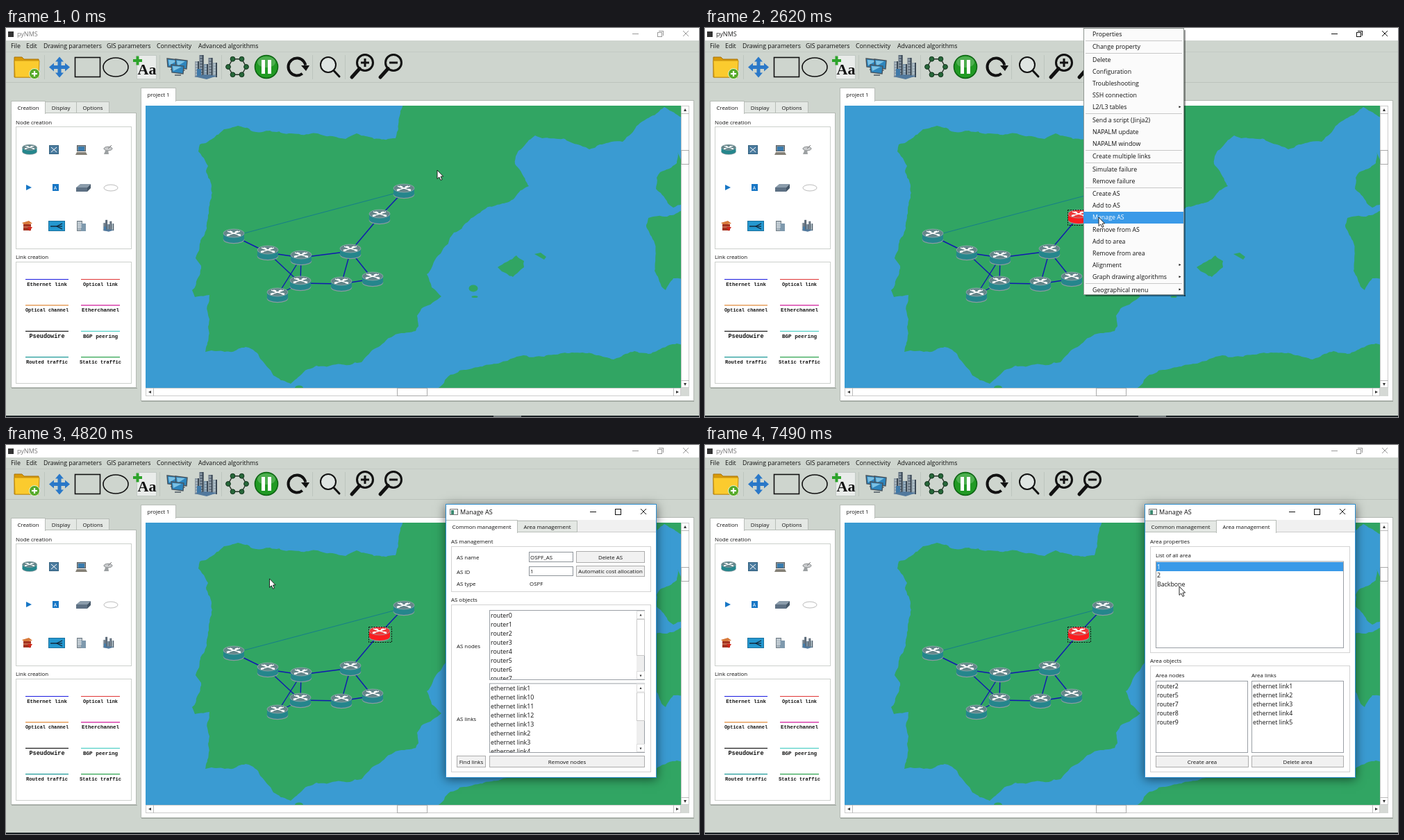
Animation of 998 by 561 pixels, one loop 8000 ms. Source, as an HTML page with a canvas:

```html
<!DOCTYPE html>
<html lang="en">
<head>
<meta charset="utf-8">
<title>pyNMS</title>
<style>
html, body { margin: 0; width: 100%; height: 100%; overflow: hidden; background: #ced5ce; }
canvas { display: block; width: 998px; height: 561px; }
</style>
</head>
<body>
<canvas id="stage" width="998" height="561"></canvas>
<script>
const c = document.getElementById('stage').getContext('2d');
const LOOP = 8000, BIG = 8.8, SMALL = 7.9;
const SANS = '"Open Sans", "Noto Sans", sans-serif';
const MONO = '"Liberation Mono", monospace';
const SEA = '#3a9bd2', LAND = '#31a563', ACCENT = '#3a9ae8', TEAL = '#25868c';

// ---------- helpers ----------
const clamp = v => Math.max(0, Math.min(1, v));
const ramp = (t, a, b) => clamp((t - a) / (b - a));
const smooth = u => u * u * (3 - 2 * u);
const easeOut = u => 1 - (1 - u) * (1 - u);

function rect(x, y, x2, y2, fill, stroke, w = 1) {
  if (fill) { c.fillStyle = fill; c.fillRect(x, y, x2 - x, y2 - y); }
  if (stroke) { c.strokeStyle = stroke; c.lineWidth = w; c.strokeRect(x + .5, y + .5, x2 - x - 1, y2 - y - 1); }
}
function line(x, y, x2, y2, color, w = 1) {
  c.strokeStyle = color; c.lineWidth = w;
  c.beginPath(); c.moveTo(x, y); c.lineTo(x2, y2); c.stroke();
}
function oval(x, y, rx, ry, fill, stroke, w = 1) {
  c.beginPath(); c.ellipse(x, y, rx, ry, 0, 0, 7);
  if (fill) { c.fillStyle = fill; c.fill(); }
  if (stroke) { c.strokeStyle = stroke; c.lineWidth = w; c.stroke(); }
}
function poly(p, fill, stroke, w = 1) {
  c.beginPath();
  for (let i = 0; i < p.length; i += 2) c.lineTo(p[i], p[i + 1]);
  c.closePath();
  if (fill) { c.fillStyle = fill; c.fill(); }
  if (stroke) { c.strokeStyle = stroke; c.lineWidth = w; c.stroke(); }
}
function text(s, x, y, size = SMALL, color = '#111', align = 'left', font = SANS, weight = '') {
  c.font = `${weight} ${size}px ${font}`;
  c.textAlign = align; c.fillStyle = color;
  c.fillText(s, x, y + 3);
}
function at(x, y, s, draw) {
  c.save(); c.translate(x, y); c.scale(s, s); draw(); c.restore();
}

// ---------- map ----------
let seed = 7;
const rnd = () => (seed = seed * 16807 % 2147483647) / 2147483647 - .5;

// Roughens each edge by splitting it at displaced midpoints.
function coast(...p) {
  const path = new Path2D();
  const edge = (x, y, x2, y2) => {
    const len = Math.hypot(x2 - x, y2 - y);
    if (len < 5 || len > 100) return path.lineTo(x2, y2);
    const k = Math.min(4, len * .2);
    const mx = (x + x2) / 2 + rnd() * k, my = (y + y2) / 2 + rnd() * k;
    edge(x, y, mx, my);
    edge(mx, my, x2, y2);
  };
  path.moveTo(p[0], p[1]);
  for (let i = 0; i < p.length - 2; i += 2) edge(p[i], p[i + 1], p[i + 2], p[i + 3]);
  path.closePath();
  return path;
}
const mainland = coast(
  572, 110, 563, 150, 561, 159, 530, 160, 505, 152, 489, 160, 440, 152, 425, 154, 380, 148, 360, 150,
  334, 141, 314, 146, 300, 158, 279, 168, 277, 178, 287, 192, 291, 199, 288, 206, 296, 228, 296, 245,
  285, 300, 273, 332, 281, 343, 268, 378, 272, 388, 293, 385, 290, 400, 293, 420, 287, 467, 315, 467,
  345, 460, 363, 470, 385, 501, 410, 513, 435, 492, 447, 487, 495, 486, 512, 482, 530, 463, 558, 444,
  590, 437, 594, 430, 592, 415, 598, 405, 627, 387, 613, 374, 606, 355, 645, 295, 685, 264, 720, 252,
  753, 228, 733, 196, 734, 185, 762, 155, 805, 160, 840, 175, 855, 168, 888, 164, 928, 128, 948, 114,
  973, 129, 973, 110);

const nodes = [[573, 235], [538, 272], [328, 300], [377, 324], [425, 331],
  [496, 322], [424, 368], [483, 369], [528, 362], [391, 385]];
const links = ['01', '15', '23', '34', '36', '45', '46', '49', '69', '67', '75', '78', '58'];

function router(x, y, s = 1, body = TEAL) {
  at(x, y, s, () => {
    oval(0, 5, 15.3, 6.2, '#8b9ba0');
    c.fillStyle = body;
    c.beginPath();
    c.ellipse(0, 4, 15, 6, 0, 0, Math.PI);
    c.lineTo(-15, -4); c.lineTo(15, -4);
    c.fill();
    oval(0, -4, 15, 6, body === TEAL ? '#65858a' : '#f0383a', '#9ab0b2', .7);
    for (const d of [1, -1]) {
      line(-9 * d, -6.8, 9 * d, -1.2, '#fff', 1.4);
      line(6 * d, -2, 10 * d, -1, '#fff', 2.4);
      line(-6 * d, -6.5, -2 * d, -5.3, '#fff', 2.4);
    }
  });
}

const africa = coast(619, 521, 640, 500, 700, 485, 745, 472, 775, 474, 800, 469, 830, 468,
  875, 478, 905, 466, 925, 470, 960, 456, 985, 455, 985, 521);
const corsica = coast(967, 179, 966, 195, 942, 208, 937, 216, 936, 232, 943, 238, 961, 259, 985, 250, 972, 190);
const sardinia = coast(985, 260, 952, 272, 925, 274, 922, 284, 934, 310, 934, 350, 950, 378, 961, 361, 985, 362);
const mallorca = coast(708, 345, 735, 328, 746, 336, 746, 345, 730, 359, 714, 351);

function map(selected) {
  c.save();
  c.beginPath(); c.rect(201, 112, 771, 407); c.clip();
  rect(201, 112, 972, 519, SEA);
  c.fillStyle = LAND;
  [mainland, africa, corsica, sardinia, mallorca].forEach(p => c.fill(p));
  poly([761, 326, 770, 324, 778, 330, 775, 334], LAND);
  oval(673, 375.5, 6.5, 5, LAND);
  oval(675, 387.5, 4.5, 1.6, LAND);
  oval(422, 519, 6, 3.5, LAND);
  line(328, 300, 573, 235, '#178087', 1.2);
  for (const [a, b] of links) line(...nodes[a], ...nodes[b], '#1018b0', 1.4);
  nodes.forEach(([x, y], i) => router(x, y, 1, selected && i === 1 ? '#fb1d20' : TEAL));
  if (selected) {
    c.setLineDash([2, 1.5]);
    rect(522, 262, 556, 285, null, '#111');
    c.setLineDash([]);
  }
  c.restore();
}

// ---------- icons ----------
function buildings(x, y, s) {
  at(x, y, s, () => {
    const tops = [-8, -17, -4, -13, -6], tones = ['#8f9ba4', '#5e6d7c', '#7b95a9', '#6d7a87', '#98a9b2'];
    tops.forEach((by, i) => {
      const bx = -15 + i * 6.5, w = 6;
      rect(bx, by, bx + w, 15, tones[i]);
      rect(bx + w - 2, by, bx + w, 15, '#3b4855');
      for (let k = by + 3; k < 13; k += 4) line(bx + 1, k, bx + w - 2, k, '#c9d8e2', .9);
    });
    rect(-12, 3, -6, 15, '#3f79a8');
    poly([-16, 14, 0, 11, 17, 13, 2, 18], '#52799d');
  });
}
function lens(x, y, r, hx, hy, w, sign) {
  const a = Math.atan2(hy - y, hx - x);
  c.lineCap = 'round';
  line(x + Math.cos(a) * r, y + Math.sin(a) * r, hx, hy, '#111', w);
  c.lineCap = 'butt';
  oval(x, y, r, r, sign ? null : '#dfe5e2', '#111', sign ? 3 : 2);
  if (sign) line(x - 6, y, x + 6, y, '#111', 3);
  if (sign === '+') line(x, y - 6, x, y + 6, '#111', 3);
}
function screen(x, y, w, h) {
  poly([x, y, x + w, y + 2, x + w - 1, y + h, x + 1, y + h - 2], '#2e85bd', '#47535d', 1.4);
  poly([x + 2, y + 2, x + w - 3, y + 3, x + 3, y + h - 4], '#7cc1e4');
  line(x + w / 2 - 4, y + h + 2, x + w / 2 + 5, y + h + 2, '#6d777d', 2);
}
function toolbar() {
  poly([12, 42, 23, 42, 26, 45, 47, 45, 47, 71, 12, 71], '#d99a08', '#a87306');
  poly([12, 47, 48, 47, 47, 71, 13, 71], '#fbcb2e', '#c79210');
  oval(41, 66, 7.5, 7.5, '#55a928', '#e7f3d5', 1);
  line(37, 66, 45, 66, '#fff', 2.2); line(41, 62, 41, 70, '#fff', 2.2);

  for (let k = 0; k < 4; k++) {
    c.save(); c.translate(77, 56.5); c.rotate(k * Math.PI / 2);
    poly([0, -15, 6, -8, 2.5, -8, 2.5, 0, -2.5, 0, -2.5, -8, -6, -8], '#2a78c8');
    c.restore();
  }
  rect(99, 42, 136, 71, null, '#111', 1.6);
  oval(158, 56.5, 18, 13.5, null, '#111', 1.6);

  rect(188, 39, 217, 74, '#e9ecea', '#c2cac5');
  text('Aa', 203, 63.5, 22, '#111', 'center', '"Liberation Serif", serif', 'bold');
  line(183, 47, 196, 47, '#2da32b', 4); line(189.5, 40.5, 189.5, 53.5, '#2da32b', 4);

  screen(232, 44, 18, 14); screen(244, 45, 17, 14); screen(238, 53, 18, 13);
  buildings(287, 56, 1);

  const hex = [...Array(6)].flatMap((_, i) => [333 + 13 * Math.cos(i * Math.PI / 3), 56 + 13 * Math.sin(i * Math.PI / 3)]);
  poly(hex, null, '#243026', 1.4);
  for (let i = 0; i < 12; i += 2) oval(hex[i], hex[i + 1], 3.4, 3.4, '#27683a', '#12331c');

  oval(375, 56, 16.5, 16.5, '#219a24', '#0d6413', 1.6);
  oval(375, 49, 13, 8, 'rgba(255,255,255,.2)');
  rect(368, 46, 373, 66, '#fff'); rect(377, 46, 382, 66, '#fff');

  c.strokeStyle = '#111'; c.lineWidth = 4;
  c.beginPath(); c.arc(419, 56, 12.5, .9, 6.1); c.stroke();
  poly([425, 54, 437, 54, 432, 62], '#111');

  lens(464, 53, 11, 480, 70, 3);
  lens(517, 50, 11.5, 498, 71, 5, '+');
  lens(558, 50, 11.5, 539, 71, 5, '-');
  for (const x of [55, 221, 310, 441, 488]) line(x + .5, 39, x + .5, 74, '#bdc5be');
}

function palette() {
  router(34, 175, .7);
  rect(62, 169, 76, 182, '#4a7b9f', '#34617f');
  line(65, 172, 73, 179, '#fff'); line(73, 172, 65, 179, '#fff');
  rect(102, 169, 115, 178, '#8c9295', '#555e64'); rect(104, 171, 113, 177, '#397caf');
  poly([102, 179, 115, 179, 117, 183, 100, 183], '#858177');
  oval(147, 174, 6, 2.8, '#c9cbcd', '#85898b'); line(147, 174, 152, 169, '#777');
  poly([143, 177, 147, 176, 148, 182, 141, 182], '#9ca0a2');
  arrow(33, 230, 1, 0, '#1676c5', 4);
  rect(67, 225, 76, 235, '#1676c5'); text('A', 71, 230, 7, '#fff', 'center');
  poly([101, 230, 107, 225, 122, 225, 117, 230], '#8b9cab');
  rect(101, 230, 117, 236, '#5e7184');
  poly([117, 230, 122, 225, 122, 231, 117, 236], '#455768');
  oval(151, 230.5, 10, 4.5, '#fff', '#bbb', 1);
  poly([23, 281, 33, 278, 38, 282, 27, 284], '#d87a3a');
  rect(25, 283, 36, 292, '#a3321f'); line(25, 287, 36, 287, '#e7a07a');
  poly([31, 287, 38, 287, 34, 293], '#d0261c');
  rect(61, 278, 85, 293, '#2497cf', '#1a719e');
  line(64, 286, 74, 286, '#123', 1.4);
  for (const y of [282, 286, 290]) line(73, 286, 81, y, '#123', 1.2);
  rect(102, 278, 110, 293, '#a8b4bd', '#75818a'); rect(108, 282, 115, 293, '#7e99ad');
  for (const y of [281, 284, 287]) line(103, y, 109, y, '#e6edf1');
  buildings(147, 285, .48);
}

const linkTypes = [
  ['Ethernet link', 7.4, '#1a1ae0'], ['Optical link', 6.95, '#e03434'],
  ['Optical channel', 6.9, '#e08a3a'], ['Etherchannel', 7.5, '#d0189a'],
  ['Pseudowire', 8.5, '#222'], ['BGP peering', 7.6, '#55d0c8'],
  ['Routed traffic', 7.15, '#1f9a98'], ['Static traffic', 7.15, '#2fa34f']];

// ---------- widgets ----------
function tab(s, x, x2, y, y2, on) {
  rect(x, on ? y - 1 : y, x2, on ? y2 + 1 : y2, on ? '#fff' : '#e4e8e4', '#b8bdb8');
  if (on) rect(x + 1, y2 - 1, x2 - 1, y2 + 2, '#fff');
  text(s, (x + x2) / 2, (y + y2) / 2, SMALL, '#111', 'center');
}
function button(s, x, y, x2, y2) {
  rect(x, y, x2, y2, '#f1f1f1', '#adadad');
  text(s, (x + x2) / 2, (y + y2) / 2 + .3, SMALL, '#111', 'center');
}
function arrow(x, y, dx, dy, color = '#333', r = 2) {
  poly([x + dx * r, y + dy * r, x - dx * r - dy * r, y - dy * r - dx * r, x - dx * r + dy * r, y - dy * r + dx * r], color);
}
function list(items, x, y, x2, y2, thumb) {
  rect(x, y, x2, y2, '#fff', '#9a9fa5');
  c.save();
  c.beginPath(); c.rect(x + 1, y + 1, x2 - x - 2, y2 - y - 2); c.clip();
  items.forEach((s, i) => text(s, x + 2, y + 7.8 + i * 13, BIG));
  c.restore();
  if (!thumb) return;
  rect(908, y + 1, 919, y2 - 1, '#eee');
  rect(908, y + 13, 920, thumb, '#fff', '#c9c9c9');
  rect(908, y + 1, 920, y + 13, '#fff', '#ddd');
  rect(908, y2 - 13, 920, y2 - 1, '#fff', '#ddd');
  arrow(914, y + 7, 0, -1, '#333', 1.5); arrow(914, y2 - 6, 0, 1, '#333', 1.5);
}
function controls(x1, x2, x3, y, color, restore) {
  if (x1) line(x1, y + .5, x1 + 9, y + .5, color);
  rect(x2, y - 4 + (restore ? 2 : 0), x2 + (restore ? 7 : 9), y + 5, null, color);
  if (restore) { line(x2 + 2, y - 3.5, x2 + 9, y - 3.5, color); line(x2 + 8.5, y - 3, x2 + 8.5, y + 3, color); }
  line(x3, y - 4, x3 + 8, y + 4, color); line(x3 + 8, y - 4, x3, y + 4, color);
}
function frame(x, y, x2, y2, body, active) {
  c.save();
  c.shadowColor = `rgba(0,0,0,${active ? .55 : .35})`;
  c.shadowBlur = active ? 14 : 9; c.shadowOffsetY = 2;
  rect(x, y, x2, y2, body);
  c.restore();
  rect(x, y, x2, y + 23, '#fff');
  rect(x, y, x2, y2, null, active ? '#2f8fd0' : '#9aa5a0');
  rect(x + 6, y + 7, x + 18, y + 16, '#f4f6f6', '#777');
  rect(x + 8, y + 9, x + 12, y + 15, '#3d8a72');
}
function appear(p, cx, cy, draw) {
  if (p <= 0) return;
  c.save();
  c.globalAlpha = p;
  const s = .94 + .06 * p;
  c.translate(cx, cy); c.scale(s, s); c.translate(-cx, -cy);
  draw();
  c.restore();
}

// ---------- windows ----------
function mainWindow(t) {
  const active = t >= 430 && t < 3180;
  rect(0, 0, 998, 561, '#ced5ce');
  rect(0, 0, 998, 18, '#fff');
  rect(3, 5, 11, 13, '#333');
  text('pyNMS', 16, 9.3, 9, active ? '#222' : '#777');
  controls(902, 938, 975, 8, active ? '#111' : '#999', true);
  [['File', 7], ['Edit', 29], ['Drawing parameters', 54], ['GIS parameters', 145], ['Connectivity', 217], ['Advanced algorithms', 277]]
    .forEach(([s, x]) => text(s, x, 26, BIG));
  line(0, 34.5, 998, 34.5, '#c3cac4');
  line(0, 78.5, 998, 78.5, '#bcc4bd');
  toolbar();

  rect(7, 122, 188, 519, '#fff', '#b4bab4');
  line(8, 519.5, 189, 519.5, '#9fa69f');
  tab('Display', 56, 102, 106, 123);
  tab('Options', 101, 149, 106, 123);
  tab('Creation', 7, 57, 106, 123, true);
  text('Node creation', 14, 135.5);
  rect(14, 142, 181, 319, null, '#ccd0cc');
  text('Link creation', 14, 329.5);
  rect(14, 337, 181, 513, null, '#ccd0cc');
  palette();
  linkTypes.forEach(([s, size, color], i) => {
    const x = i % 2 ? 136 : 59, y = 363 + (i >> 1) * 37.4, half = i % 2 ? 28 : 31;
    line(x - half, y - .5, x + half, y - .5, color, 1.2);
    text(s, x, y + 6, size, '#111', 'center', MONO, 'bold');
  });

  rect(194, 104, 991, 538, '#fff', '#b4bab4');
  line(195, 538.5, 991, 538.5, '#9fa69f');
  tab('project 1', 194, 245, 87, 105, true);
  map(t >= 1240);

  rect(972, 112, 984, 519, '#fff', '#ccc');
  line(972, 123.5, 984, 123.5, '#bbb'); line(972, 508.5, 984, 508.5, '#bbb');
  rect(972, 176, 984, 197, '#fff', '#aaa');
  arrow(978, 118, 0, -1); arrow(978, 514, 0, 1);
  rect(201, 519, 972, 531, '#fff', '#ccc');
  line(212.5, 519, 212.5, 531, '#bbb'); line(961.5, 519, 961.5, 531, '#bbb');
  rect(563, 519, 607, 531, '#fff', '#aaa');
  arrow(207, 525, -1, 0); arrow(967, 525, 1, 0);
  rect(972, 519, 984, 531, '#d5d9d5');

  rect(0, 559, 998, 561, '#1b2225');
  if (t < 4000) {
    const x = t < 430 ? 702 : 624;
    rect(x, 559, x + 40, 561, '#777f80');
  }
}

// '|' starts a new group, '>' opens a submenu
const menuItems = ('Properties,|Change property,|Delete,Configuration,Troubleshooting,SSH connection,>L2/L3 tables,' +
  '|Send a script (Jinja2),NAPALM update,NAPALM window,|Create multiple links,|Simulate failure,Remove failure,' +
  '|Create AS,Add to AS,Manage AS,Remove from AS,Add to area,Remove from area,>Alignment,>Graph drawing algorithms,' +
  '|>Geographical menu').split(',');

function contextMenu(alpha, hover) {
  if (alpha <= 0) return;
  c.save();
  c.globalAlpha = alpha;
  rect(690, 3, 692, 387, 'rgba(0,0,0,.4)'); rect(548, 385, 692, 387, 'rgba(0,0,0,.4)');
  rect(545, 0, 690, 385, '#fbfbfb', '#8f9691');
  if (hover) rect(545, 265, 689, 282, ACCENT);
  let y = 9;
  for (const item of menuItems) {
    if (item[0] === '|') {
      y += 1.2;
      line(548, Math.round(y - 9.5) + .5, 687, Math.round(y - 9.5) + .5, '#c8c8c8');
    }
    const label = item.replace(/^[|>]+/, '');
    text(label, 558, y, BIG, hover && label === 'Manage AS' ? '#fff' : '#111');
    if (item.includes('>')) arrow(684, y - .5, 1, 0, '#111', 1.5);
    y += 17.15;
  }
  c.restore();
}

function chooser(t) {
  const active = t < 3960;
  frame(333, 133, 438, 207, t < 3420 ? '#cbe8cb' : '#f0f0f0', active);
  controls(0, 378, 415, 144, active ? '#111' : '#888');
  rect(341, 164, 428, 178, '#eee', '#a5a5a5');
  text('AS1', 344, 171.5);
  arrow(423, 171.3, 0, 1, '#333', 1.3);
  button('OK', 341, 183, 383, 199);
  button('Cancel', 387, 183, 429, 199);
}

const names = (s, a) => a.map(n => s + n);
function manager(area) {
  frame(633, 85, 937, 480, '#f0f0f0', true);
  text('Manage AS', 654, 96.5, 9);
  controls(841, 877, 914, 96, '#111');
  rect(634, 125, 936, 479, '#fff');
  line(634, 125.5, 936, 125.5, '#ccc');
  tab('Common management', 633, 737, 109, 126, !area);
  tab('Area management', 736, 823, 109, 126, area);
  rect(633, 85, 937, 480, null, '#2f8fd0');
  const box = (y, y2) => rect(641, y, 929, y2, null, '#d3d3d3');
  if (area) {
    text('Area properties', 641, 139); box(146, 300);
    text('List of all area', 649, 159);
    list(['', '2', 'Backbone'], 649, 167.5, 920, 293);
    rect(650, 169, 919, 182, ACCENT);
    text('1', 651, 175.5, BIG, '#fff');
    text('Area objects', 641, 311); box(318, 472);
    text('Area nodes', 649, 331.5); text('Area links', 787, 331.5);
    list(names('router', [2, 5, 7, 8, 9]), 649, 340, 782, 444);
    list(names('ethernet link', [1, 2, 3, 4, 5]), 787, 340, 920, 444);
    button('Create area', 649, 448, 783, 465);
    button('Delete area', 787, 448, 920, 465);
    return;
  }
  text('AS management', 641, 139); box(146, 212);
  text('AS name', 649, 162); text('AS ID', 649, 182.5); text('AS type', 649, 200);
  rect(753, 154, 817, 169, '#fff', '#8d9399'); text('OSPF_AS', 755, 161.5);
  rect(753, 175, 817, 189, '#fff', '#8d9399'); text('1', 755, 182);
  text('OSPF', 754, 200);
  button('Delete AS', 821, 153, 920, 170);
  button('Automatic cost allocation', 821, 174, 920, 190);
  text('AS objects', 641, 223); box(230, 472);
  text('AS nodes', 649, 289.5); text('AS links', 649, 394.5);
  list(names('router', [0, 1, 2, 3, 4, 5, 6, 7]), 696, 238, 920, 339, 304);
  list(names('ethernet link', [1, 10, 11, 12, 13, 2, 3, 4]), 696, 343.5, 920, 444, 398);
  button('Find links', 649, 448, 691, 465);
  button('Remove nodes', 696, 448, 920, 465);
}

// ---------- pointer ----------
const moves = [
  [550, 1210, 544, 270, smooth], [2380, 2620, 567, 273, smooth], [3340, 3930, 378, 193, smooth],
  [4790, 5540, 704, 160, smooth], [5540, 6140, 752, 121, easeOut], [7040, 7490, 683, 204, smooth]];

function pointer(t) {
  let x = 621, y = 205;
  for (const [a, b, tx, ty, ease] of moves) {
    const u = ease(ramp(t, a, b));
    x += (tx - x) * u; y += (ty - y) * u;
  }
  const hand = t < 2120 && x > 523 && x < 555 && y > 262 && y < 284;
  at(x, y, 1, () => {
    if (hand) poly([-1, 0, 1, 0, 2, 1, 2, 6, 8, 7, 9, 9, 8, 13, 7, 16, 0, 16, -4, 10, -4, 8, -1, 10], '#fff', '#111', 1);
    else poly([0, 0, 0, 12.5, 2.8, 10, 5, 14.5, 7, 13.5, 5, 9.2, 8.6, 9], '#fff', '#111', .9);
  });
}

function draw(t) {
  mainWindow(t);
  if (t >= 1800) contextMenu((.25 + .75 * ramp(t, 1800, 1920)) * (1 - ramp(t, 3130, 3250)), t >= 2380);
  if (t < 4430) appear(ramp(t, 3180, 3310) * (1 - ramp(t, 4290, 4430)), 385, 170, () => chooser(t));
  appear(ramp(t, 3940, 4110), 785, 282, () => manager(t >= 6640));
  pointer(t);
}

let start;
function tick(now) {
  start ??= now;
  draw((now - start) % LOOP);
  requestAnimationFrame(tick);
}
draw(0);
requestAnimationFrame(tick);
</script>
</body>
</html>
```
